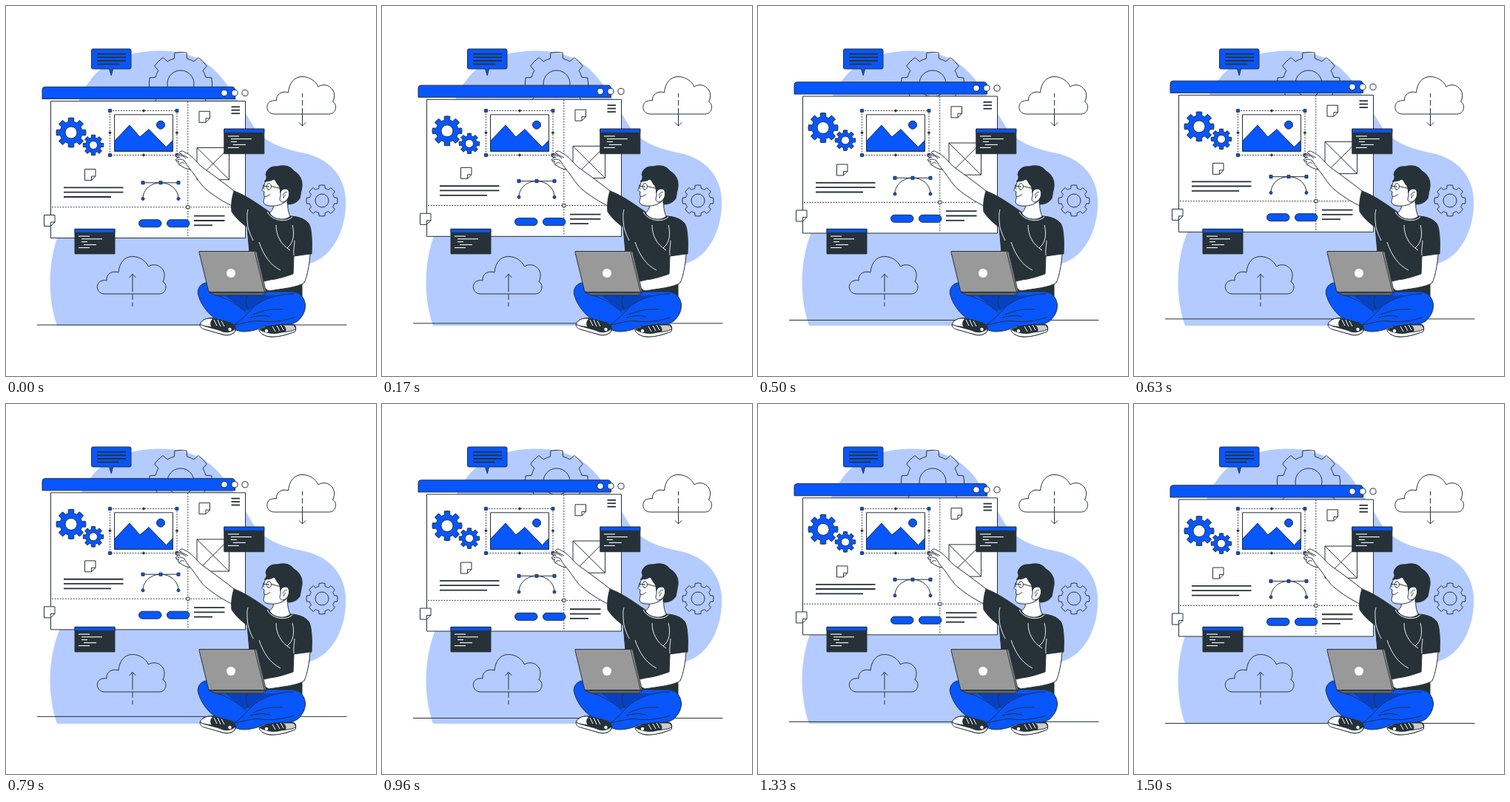
These frames come from a looping animation (500x500 px, 1540 ms). An HTML page with a canvas:

```html
<!DOCTYPE html>
<html lang="en">
<head>
<meta charset="utf-8">
<title>Designer at work</title>
<style>
html, body { margin: 0; width: 100%; height: 100%; overflow: hidden; background: #fff; }
canvas { display: block; width: 500px; height: 500px; }
</style>
</head>
<body>
<canvas id="stage"></canvas>
<script>
const canvas = document.getElementById('stage');
const ctx = canvas.getContext('2d');
const ratio = window.devicePixelRatio || 1;
canvas.width = canvas.height = 500 * ratio;

const BLUE = '#0756ff', NAVY = '#0541c2', PALE = '#b4cbff', INK = '#263238', WHITE = '#fff', GREY = '#999';
const LOOP = 1540, STEPS = 37, RISE = 10, FIRST_PHASE = 1 / 36;

function shape(d, fill, stroke = INK, width = 1) {
  const path = d instanceof Path2D ? d : new Path2D(d);
  if (fill) { ctx.fillStyle = fill; ctx.fill(path); }
  if (stroke) { ctx.strokeStyle = stroke; ctx.lineWidth = width; ctx.stroke(path); }
}

const line = (d, color = INK, width = 1) => shape(d, null, color, width);

function box(x, y, w, h, fill, stroke = INK, r = 0) {
  const path = new Path2D();
  path.roundRect(x, y, w, h, r);
  shape(path, fill, stroke);
}

function disc(x, y, r, fill, stroke = INK, width = 1) {
  const path = new Path2D();
  path.arc(x, y, r, 0, Math.PI * 2);
  shape(path, fill, stroke, width);
}

function dashed(d, pattern) {
  ctx.setLineDash(pattern);
  line(d);
  ctx.setLineDash([]);
}

function at(x, y, draw) {
  ctx.save();
  ctx.translate(x, y);
  draw();
  ctx.restore();
}

// Horizontal strokes, each given as [x1, x2, y]
const rows = (list, color, width) => list.forEach(([a, b, y]) => line(`M${a} ${y}H${b}`, color, width));

function gear(x, y, outer, root, hole, fill, holeFill) {
  const path = new Path2D();
  for (let i = 0; i < 8; i++) {
    const a = i * Math.PI / 4 - Math.PI / 2;
    path.arc(x, y, outer, a - 0.19, a + 0.19);
    path.arc(x, y, root, a + 0.25, a + Math.PI / 4 - 0.25);
  }
  path.closePath();
  shape(path, fill);
  disc(x, y, hole, holeFill);
}

function note(x, y) {
  at(x, y, () => shape('M0 0H14.5V9.5L9 15H0ZM14.5 9.5H9V15', WHITE));
}

function codeWindow(x, y) {
  at(x, y, () => {
    box(0, 0, 54, 33.5, INK);
    box(0, 0, 54, 5, BLUE);
    rows([[5, 20, 9.7], [9, 37, 13.4], [9, 17, 17.2], [12, 29, 21.2], [5, 20, 25.2]], WHITE, 1.1);
  });
}

function cloud(x, y) {
  at(x, y, () => line('M10 50.500C-1 50.500 -3 36 6 33C9 32 11 32 13 32.500C12 24 20 18.500 29 21.500' +
    'C30 9 37 0 47.500 0C58 0 66 6 69.500 13.500C81 6 97 18 89 34C95 36 95 50.500 84 50.500Z'));
}

function backdrop() {
  shape('M69 432C56 395 56 345 72 306C86 270 82 215 89 165C92 140 103 114 112 103C116 97 121 91 126 87' +
    'C149 67 180 60.500 210 60.500C232 60.500 252 66 268 76C292 91 305 116 322 142' +
    'C334 162 338 170 350 179C365 190 384 195 404 199C434 206 457 227 459 260C461 300 443 338 411 348L370 372L340 432Z', PALE, null);
  gear(236, 105, 42.6, 35, 18, null, null);
  gear(427, 263, 21, 17, 9, null, null);
  cloud(352.5, 95.5);
  line('M400.500 162V138M400.500 134.500V127M400.500 123.500V118M396 157.500L400.500 162L405 157.500');
  cloud(123, 338.5);
  line('M171 362V386M171 389.500V397M171 400.500V406M166.500 367L171 362.500L175.500 367');
}

function bubble() {
  shape('M117.500 58H167Q169 58 169 60V83Q169 85 167 85H144.500L142.300 94L139.500 85H117.500Q115.500 85 115.500 83V60Q115.500 58 117.500 58Z', BLUE);
  rows([[123, 162, 64.8], [123, 162, 69.3], [123, 162, 74], [123, 153, 78.6]], INK, 1.8);
}

function browser() {
  line('M42 431H460.500');
  shape('M49 125.500V113Q49 109.300 53 109.300H305Q309.500 109.300 309.500 114V125.500Z', BLUE);
  [295, 309, 323].forEach(x => disc(x, 117.5, 4.1, WHITE));
  box(60.5, 128.5, 263, 185, WHITE);
  dashed('M62 271.800H322M245.800 129V311', [1.8, 1.8]);
  box(243.8, 269.8, 4, 4, WHITE);
  rows([[304.5, 316, 136.3], [304.5, 316, 140.7], [304.5, 316, 145.2]], INK, 1.8);
  note(261, 142.3);
  note(106.5, 220.5);
  note(51.5, 282.5);
  gear(88, 171, 20, 15, 8, BLUE, WHITE);
  gear(118, 188, 13.8, 10.3, 5.5, BLUE, WHITE);
  rows([[78, 158.5, 245.4], [78, 158.5, 251.6], [78, 142, 258]], INK, 1.8);
  rows([[254, 295.5, 283.7], [254, 295.5, 290], [254, 279, 296.3]], INK, 1.8);
  [179.5, 217.5].forEach(x => box(x, 288.8, 30.5, 10, BLUE, INK, 5));
  line('M258 191.500H301.500V234.700H258ZL301.500 234.700M301.500 191.500L258 234.700');
  line('M185 238.800H233M185 260.500C185 248 196 238.800 209 238.800C222 238.800 233 248 233 260.500');
  [185, 209, 233].forEach(x => box(x - 2, 236.8, 4, 4, BLUE));
  [185, 233].forEach(x => disc(x, 260.5, 2, BLUE));
}

function picture() {
  dashed('M140.500 141.500H231V201.500H140.500Z', [1.8, 1.8]);
  [140.5, 231].forEach(x => {
    [141.5, 201.5].forEach(y => box(x - 1.9, y - 1.9, 3.8, 3.8, BLUE));
  });
  [[186, 141.5], [186, 201.5], [140.5, 171.3], [231, 171.3]].forEach(([x, y]) =>
    shape(`M${x - 2} ${y}l2-2 2 2-2 2z`, INK, INK, 0.5));
  box(146.5, 146.8, 79, 49.5, WHITE);
  shape('M146.500 196.300V182.500L167 161L181 177L193 166.500L216.500 190.700L225.500 181.500V196.300Z', BLUE);
  disc(209, 160.7, 5.5, BLUE);
}

function pointingArm() {
  shape('M312 253C297 241 281 229 266 218.500C258 212 253 204 246 200C242 198 239 195 236 196.500' +
    'C233 198 235 199.500 237 200C233 200.500 229 201 230 203.500C231 205 234 204 235 204.500' +
    'C231 205 228 207 230 209.500C231 211 233 210 234 210C231 212 233 215 236 215.500' +
    'C239 218 243 220 249 221C254 226 261 239 269 246.500C280 256 294 265 309 272Z', WHITE);
  line('M230 203.500C235 201 239 202 243 206M230 209C234 206 238 207 241 209M234 214C237 211 239 211 241 213' +
    'M236 200L246 205M241 209C243 213 246 217 249 221');
}

function legs() {
  shape('M276 374C264 372 257 382 260 391C264 405 274 417 286 425L306 434C309 439 319 441 328 439.500' +
    'C338 438 343 436 348 433C365 433 385 432 394 426C402 419 406 409 404 401C402 392 396 387 387 386H280Z', BLUE);
  shape('M296 391H366C350 395 340 401 331 409L323 412Z', NAVY, null);
  line('M389 389C366 389 344 397 332 409C323 419 315 427 306 433M326 391C323 397 324 404 328 411' +
    'M281 390C295 393 311 402 324 414M308 431C322 429 334 424 345 426C360 428 377 425 389 421' +
    'M334 417C347 411 360 409 374 410M330 421C341 418 350 418 357 420');
}

function shoes() {
  shape('M263 428C267 423 273 421 281 422L304 428C309 430 312 435 310 439C307 444 300 446 293 444' +
    'L270 437C264 435 261 433 263 428Z', INK);
  shape('M263 428C267 423 273 421 280 422.500C276 426 276 430 278 434L266 432C263 431 262 430 263 428Z', WHITE);
  shape('M262 430C270 434 284 436 293 440C299 442 306 440 310 436C311 441 304 446 295 444.500L268 437C264 436 262 433 262 430Z', WHITE);
  line('M281 424L285 432M286 424L290 433M291 425.500L295 433', WHITE);
  disc(302.5, 437, 2.2, WHITE, null);

  shape('M343 437C350 432 365 431 375 430H388C392 431 393 437 390 440C381 444 370 447 357 447C349 446 343 442 343 437Z', INK);
  shape('M374 431H387C391 432 392 436 391 439L377 441C379 437 378 434 374 431Z', '#ccc');
  shape('M342 437C350 442 362 444 372 441C379 440 386 440 391 437C393 440 389 441 385 442C374 446 363 448 354 446.500C347 445 342 441 342 437Z', WHITE);
  line('M360 433L364 440M366 432L370 439M371 431L375 438', WHITE);
  disc(352, 439, 2.2, WHITE, null);
}

function torso() {
  shape('M308 250C305 260 304 269 305 278C311 287 319 294 326 299L330 345L345 392L400 395L400 374' +
    'C390 370 388 352 389 338L413 335C414 318 413 299 409 294C404 287 393 284 383 284L357 279C341 268 325 256 308 250Z', INK);
  line('M327 275C325 282 326 291 327 299C329 306 331 311 334 317M342 319C348 337 357 350 371 357' +
    'M365 296C365 310 371 322 384 330M387 296C390 308 389 320 380 327M389 337C388 330 390 322 390 317', WHITE, 0.9);
}

function head() {
  shape('M361 266C362 272 361 276 356 279C360 289 378 291 384 284C381 278 380 270 381 261Z', WHITE);
  line('M353 278C358 289 377 294 387 285', WHITE);
  shape('M352 233C350 239 349 243 346 248C345 250 348 250 349 251L348.500 255C349 257 349.500 258 349 260' +
    'C347 265 348 268 353 269.500C364 272 376 268 381 261L386 237L367 225Z', WHITE);
  shape('M349 237C352 235 353 232 351 228C352 221 358 216 366 217C377 214 385 217 389 223C397 227 401 236 400 244' +
    'C399 250 398 255 397 260C393 266 387 268 381 268C379 266 380 263 381 260L371 253C370 249 371 245 367 241' +
    'C365 238 364 235 362 234C357 237 353 237 349 237Z', INK);
  shape('M371 252C372 247 380 245 382 250C384 257 380 264 374 265C370 265 369 261 371 257Z', WHITE);
  line('M374 256C376 251 379 251 380 252M375 260C375 257 377 256 378 255');
  shape('M355 239.500C351.500 240 351.500 248 355 248.500C359.500 248 359.500 240 355 239.500Z', WHITE);
  line('M349.500 240.500C347 241 347 247 349.500 247.500M350 243.500H352.500M358.500 243.500L370 246.500M349 257C352 258 355 256.500 357 254');
  disc(354.5, 244, 1, INK, null);
  disc(349.5, 244, 0.8, INK, null);
}

function laptop() {
  shape('M389 338L411 335C410 350 407 365 403 374C395 380 375 382 355 385L348 381L348 372L357 370C368 369 379 365 388 362Z', WHITE);
  shape('M274 387H351.500L347 391H283Z', '#606468');
  shape('M262 331.500H336.500Q338.500 331.500 339 333.500L351.500 386.500H276Q274 386.500 273.500 384.500L261 333Q260.500 331.500 262 331.500Z', GREY);
  line('M336 332L349.500 386.500');
  disc(304, 361, 6, WHITE, null);
}

function render(time) {
  const step = Math.floor((time % LOOP) / LOOP * STEPS + 0.1) % STEPS;
  const phase = FIRST_PHASE + (1 - FIRST_PHASE) * step / (STEPS - 1);
  const rise = RISE * (1 - Math.abs(2 * phase - 1));
  ctx.setTransform(ratio, 0, 0, ratio, 0, 0);
  ctx.lineJoin = 'round';
  ctx.fillStyle = WHITE;
  ctx.fillRect(0, 0, 500, 500);
  backdrop();
  at(0, RISE * 2 * FIRST_PHASE - rise, browser);
  bubble();
  picture();
  codeWindow(294.8, 166.2);
  codeWindow(93, 301.4);
  pointingArm();
  torso();
  legs();
  shoes();
  head();
  laptop();
}

const start = performance.now();
function tick() {
  render(performance.now() - start);
  requestAnimationFrame(tick);
}
tick();
</script>
</body>
</html>
```
